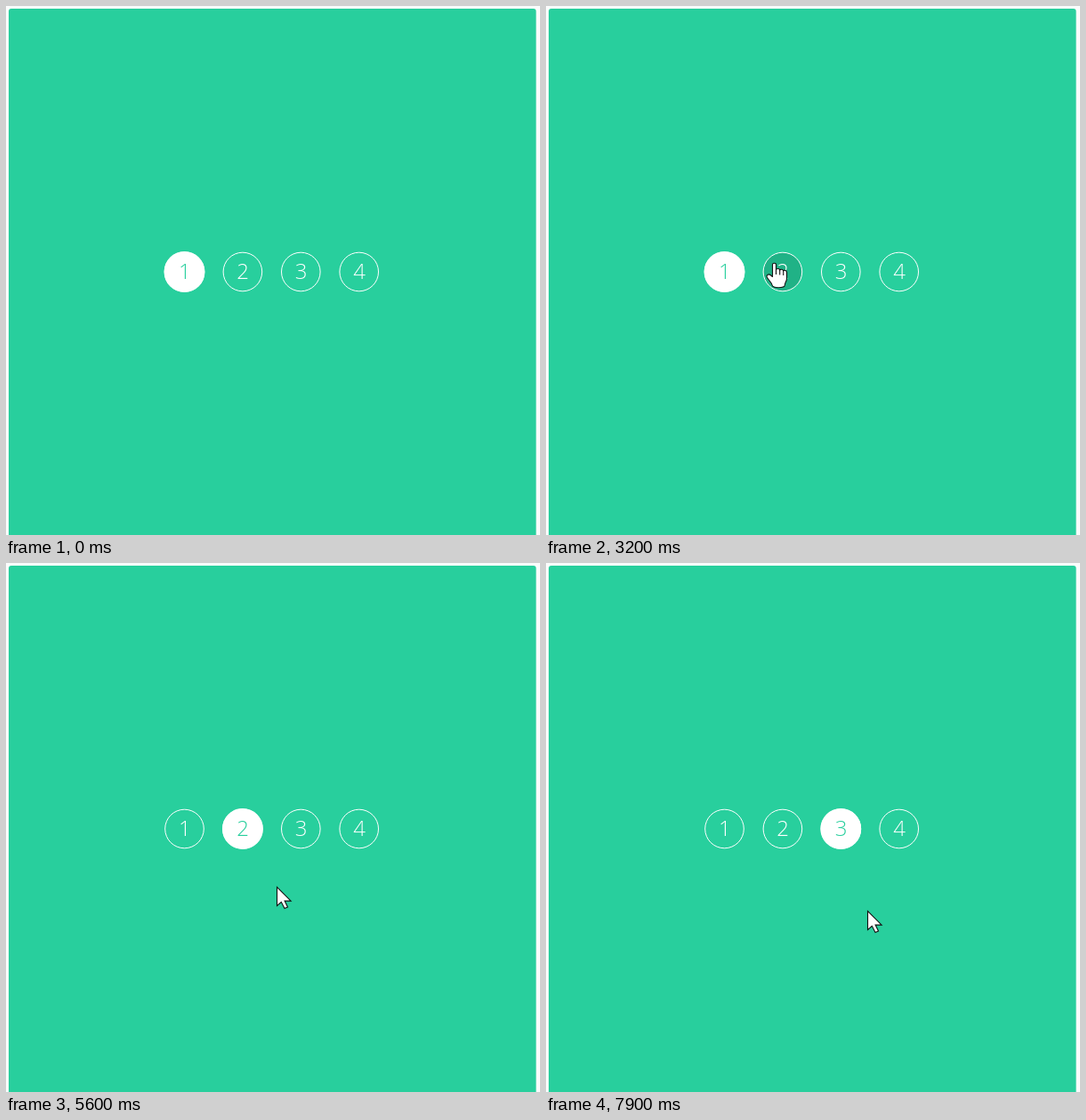
An HTML page for the animation above (8000 ms loop, 600x595 px).

```html
<!DOCTYPE html>
<html lang="en">
<head>
<meta charset="utf-8">
<title>Pagination hover</title>
<style>
  html, body { margin: 0; width: 100%; height: 100%; overflow: hidden; background: #fbfcfc; }
  svg { display: block; width: 600px; height: 595px; }
  text { font: 300 24px "Open Sans", "Noto Sans", sans-serif; text-anchor: middle; }
  .pointer { fill: #fff; stroke: #111; stroke-width: 1.1; }
  #hand { stroke-linejoin: round; stroke-linecap: round; }
</style>
</head>
<body>
<svg viewBox="0 0 600 595">
  <rect x="3" y="3" width="592.6" height="600" rx="3" fill="#28cf9d"/>
  <g id="dots"></g>
  <path id="arrow" class="pointer" d="M0 0V21L4.8 16.8L8.5 24L12 22.4L8.6 15.6H15.6Z"/>
  <g id="hand" class="pointer">
    <path d="M-3 15V1.6C-3 -.9 1 -.9 1 1.6V7.2C1.6 5.4 5 5.6 5.2 7.6C5.8 6.2 8.9 6.4 9.2 8.4C9.9 7.2 13 7.6 13 10V17C13 20 10.8 22 10.8 24.5C10.8 26.4 7 27.2 3.6 27.2C.4 27.2 -3.2 26.2 -3.6 24C-4 21.6 -7.6 18.6 -9.2 15.4C-10.2 12.8 -7 11.6 -5.4 13Z"/>
    <path fill="none" d="M1 7.2V12M5.2 7.6V12.4M9.2 8.4V13"/>
  </g>
</svg>
<script>
const LOOP = 8000, STEP = 100, FADE = 300;
const COUNT = 4, FIRST = 200.5, GAP = 65.4, CY = 299;
const NS = "http://www.w3.org/2000/svg";
const GREEN = [40, 207, 157], WHITE = [255, 255, 255];

// Time each dot is selected, and the span in which it is hovered.
const selected = [-FADE, 4300, 6700];
const hovered = { 1: [2500, 5200], 2: [6000, 7200] };

// A bend above 1 leaves the vertical part of a move to its end.
const entry = [600, 362];
const moves = [
  { at: 1340, last: 1260, to: [248, 292], bend: 9.5 },
  { at: 2600, last: 600, to: [257, 289] },
  { at: 4200, last: 300, to: [257, 292] },
  { at: 5200, last: 400, to: [304, 364] },
  { at: 5600, last: 500, to: [335, 294] },
  { at: 7200, last: 500, to: [361, 391] }
];

const mix = (a, b, k) => a + (b - a) * k;
const clamp = k => Math.min(1, Math.max(0, k));
const easeOut = k => 1 - (1 - k) ** 1.35;
const ramp = (t, from = Infinity) => clamp((t - from) / FADE);
const pulse = (t, from, to) => ramp(t, from) - ramp(t, to);

function set(el, attrs) {
  for (const name in attrs) el.setAttribute(name, attrs[name]);
}

function add(tag, attrs) {
  const el = document.createElementNS(NS, tag);
  set(el, attrs);
  return document.getElementById("dots").appendChild(el);
}

const dots = Array.from({ length: COUNT }, (_, i) => {
  const x = FIRST + GAP * i, at = { cx: x, cy: CY };
  const dot = {
    x,
    shade: add("circle", { ...at, r: 22, fill: "#20b286" }),
    disc: add("circle", { ...at, r: 22.8, fill: "#fff" }),
    ring: add("circle", { ...at, fill: "none", stroke: "#fff" }),
    label: add("text", { x: x + 0.3, y: 307 })
  };
  dot.label.textContent = i + 1;
  return dot;
});

const arrow = document.getElementById("arrow");
const hand = document.getElementById("hand");

function drawDot(dot, i, t) {
  const active = pulse(t, selected[i], selected[i + 1]);
  const hover = pulse(t, ...(hovered[i] || []));
  const width = mix(1, 2, active);
  set(dot.shade, { opacity: hover });
  set(dot.disc, { opacity: active * (1 - hover) });
  set(dot.ring, { r: mix(22.3, 22.9, active) - width / 2, "stroke-width": width });
  set(dot.label, { fill: `rgb(${WHITE.map((v, n) => mix(v, GREEN[n], active))})` });
}

function pointerAt(t) {
  let [x, y] = entry;
  for (const { at, last, to, bend = 1 } of moves) {
    const k = easeOut(clamp((t - at) / last));
    x = mix(x, to[0], k);
    y = mix(y, to[1], k ** bend);
  }
  return [Math.round(x), Math.round(y)];
}

function drawPointer(t) {
  const [x, y] = pointerAt(t);
  const shown = t > moves[0].at;
  const over = dots.some(dot => Math.hypot(x - dot.x, y - CY) < 23);
  const transform = `translate(${x + 0.5} ${y + 0.5})`;
  set(arrow, { transform, visibility: shown && !over ? "visible" : "hidden" });
  set(hand, { transform, visibility: shown && over ? "visible" : "hidden" });
}

const start = performance.now();

function draw() {
  const t = Math.floor((performance.now() - start) % LOOP / STEP) * STEP;
  dots.forEach((dot, i) => drawDot(dot, i, t));
  drawPointer(t);
  requestAnimationFrame(draw);
}
draw();
</script>
</body>
</html>
```
